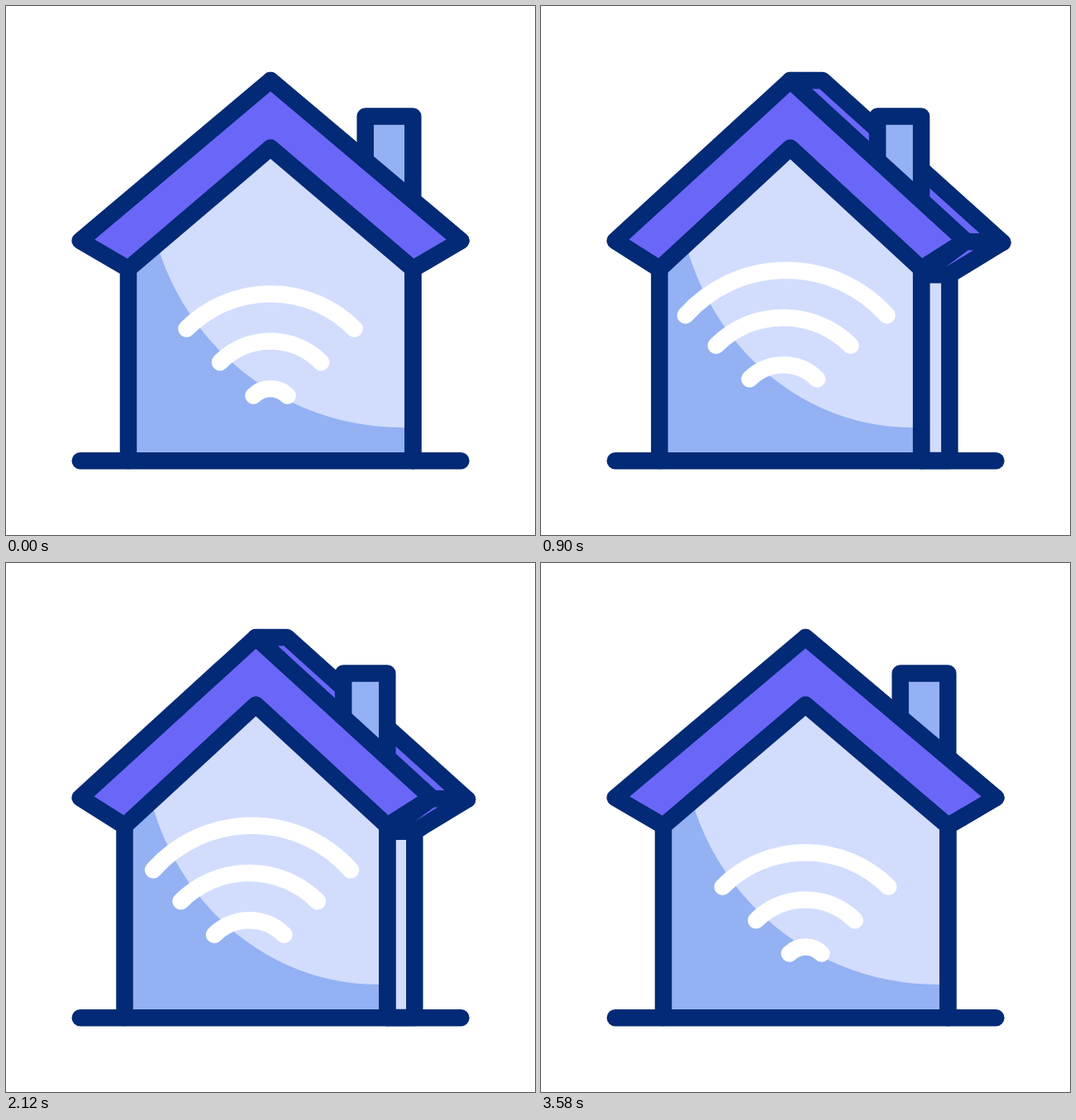
These frames come from a looping animation (640 px wide and 640 px high, 3600 ms). An HTML page:

```html
<!DOCTYPE html>
<html lang="en">
<head>
<meta charset="utf-8">
<title>Smart home</title>
<style>
  html, body { margin: 0; width: 100%; height: 100%; overflow: hidden; background: #fff; }
  svg { display: block; width: 100vw; height: 100vh; }
  .line { stroke: #032a76; stroke-width: 20.5; stroke-linecap: round; stroke-linejoin: round; }
  .front .line { vector-effect: non-scaling-stroke; }
  .roof { fill: #6a66f8; }
  .pale { fill: #d2dcfd; }
  .blue { fill: #93b1f3; }
  .none { fill: none; }
  .wave { fill: none; stroke: #fff; stroke-width: 20.5; stroke-linecap: round; stroke-linejoin: round; }
</style>
</head>
<body>
<svg viewBox="0 0 640 640">
  <defs>
    <clipPath id="room"><path d="M148 550V318L320 171.5 492.3 318V550Z"/></clipPath>
  </defs>
  <polygon id="sideWall" class="line pale"/>
  <polygon id="sideRoof" class="line roof"/>
  <polygon id="under" class="line roof"/>
  <g class="front">
    <path class="line blue" d="M434.7 187V133.5H492.3V235"/>
    <g clip-path="url(#room)">
      <path class="blue" d="M148 550V318L320 171.5 492.3 318V550Z"/>
      <circle class="pale" cx="480" cy="200" r="310"/>
    </g>
    <path class="line none" d="M148 318V550M492.3 318V550"/>
    <path class="line roof" d="M320 90L550.3 284 492.3 318 320 171.5 148 318 89.7 284Z"/>
  </g>
  <path class="line none" d="M89.8 550.3H550.4"/>
  <g id="waves"></g>
</svg>
<script>
const LOOP = 3600, TURN = 1500, BEAT = 600;
const PIVOT = 89.7, SQUEEZE = 0.1155;
const GAP = 57.3, BASE = 29, WAVE_Y = 492;

const $ = id => document.getElementById(id);
const front = document.querySelector('.front');
const waves = [-1, 0, 1, 2].map(n => {
  const el = document.createElementNS('http://www.w3.org/2000/svg', 'path');
  el.setAttribute('class', 'wave');
  $('waves').append(el);
  return { n, el };
});

// cubic-bezier(.5, 0, .5, 1)
function ease(x) {
  let lo = 0, hi = 1;
  for (let i = 0; i < 24; i++) {
    const s = (lo + hi) / 2;
    if (1.5 * s * (1 - s) + s ** 3 < x) lo = s; else hi = s;
  }
  return lo * lo * (3 - 2 * lo);
}

const setPoints = (id, ...pts) => $(id).setAttribute('points', pts.join(' '));

function drawHouse(p) {
  const k = 1 - SQUEEZE * p;
  const fx = x => PIVOT + (x - PIVOT) * k;
  front.setAttribute('transform', `matrix(${k} 0 0 1 ${PIVOT * (1 - k)} 0)`);

  const apex = [fx(320), 90], tip = [fx(550.3), 284 + 1.5 * p];
  const backApex = [320 + 30 * p, 90], backTip = [550.3 + 11.6 * p, 284 + 3 * p];
  const wall = fx(492.3), backWall = 492.3 + 3 * p, eave = 318 + 10 * p;
  setPoints('sideWall', [wall, eave], [backWall, eave], [backWall, 550], [wall, 550]);
  setPoints('sideRoof', apex, backApex, backTip, tip);
  setPoints('under', tip, backTip, [backWall, eave], [wall, eave]);
}

function arc(cx, top, half, rise) {
  const r = (half * half + rise * rise) / (2 * rise);
  return `M${cx - half} ${top + rise}A${r} ${r} 0 0 1 ${cx + half} ${top + rise}`;
}

function wavePath(n, u, cx, p) {
  let r = BASE + GAP * (n + u), angle = Math.PI / 4;
  if (n < 0) {
    // a new wave opens from a dot
    if (u <= 0.54) return '';
    r = BASE - 48 * (1 - u);
    angle *= 1 - ((1 - u) / 0.46) ** 2;
  }
  let half = r * Math.sin(angle), rise = r * (1 - Math.cos(angle));
  if (n === 2) {
    // the widest wave bends, then closes up
    if (u >= 0.7) return '';
    const open = 1 - (Math.max(0, u - 0.5) / 0.2) ** 2;
    half *= open;
    rise = (rise + 8 * u) * open;
    cx += 5 * p * Math.min(1, 2 * u);
  }
  return arc(cx, WAVE_Y - r, half, rise);
}

function frame() {
  const t = performance.now() % LOOP;
  const p = ease(Math.max(0, 1 - Math.abs(t - TURN) / TURN));
  const u = t % BEAT / BEAT;
  drawHouse(p);
  for (const { n, el } of waves) el.setAttribute('d', wavePath(n, u, 320 - 38.7 * p, p));
  requestAnimationFrame(frame);
}
frame();
</script>
</body>
</html>
```
